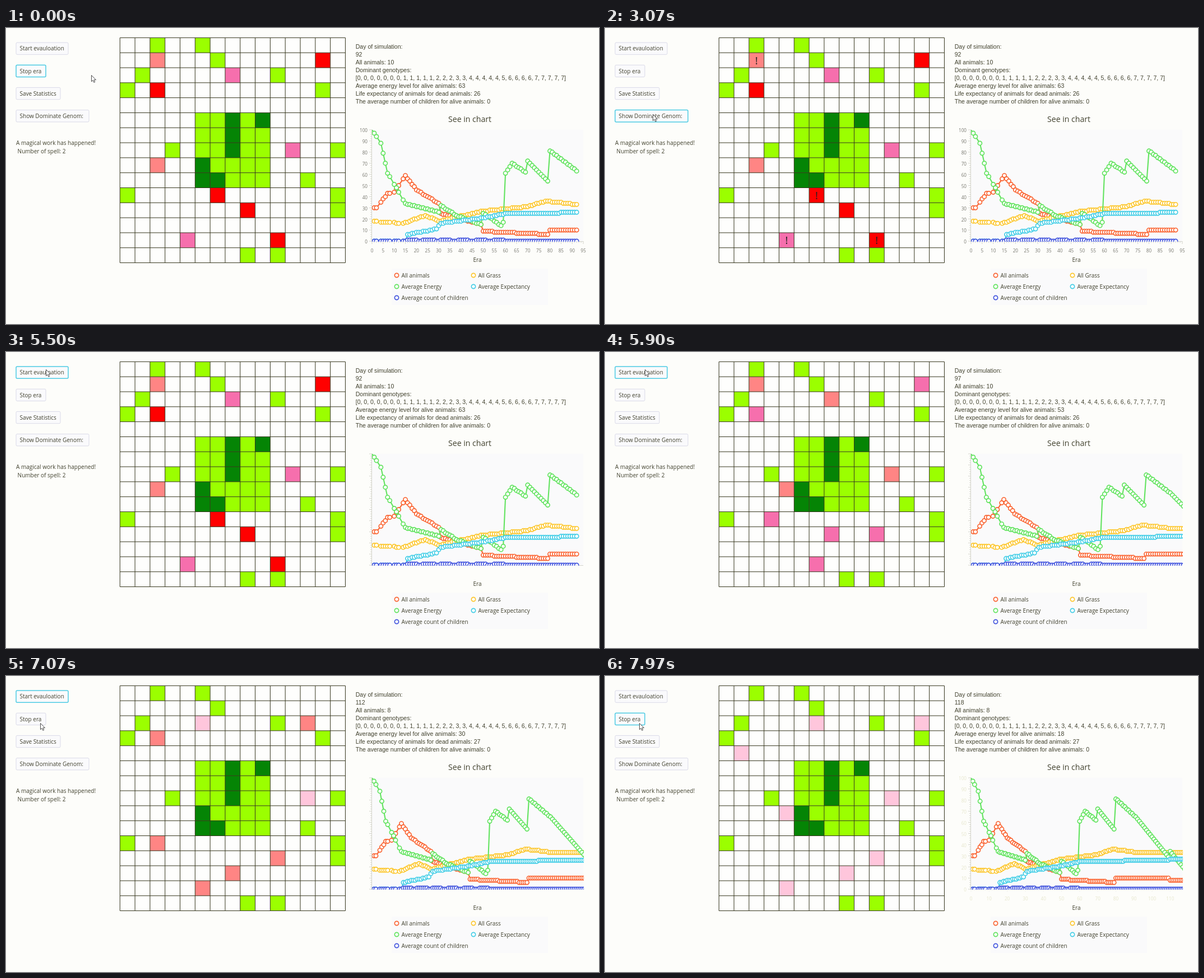
Write an HTML page with a canvas that moves like this. It is 1058 px wide and 529 px high and loops after 8 s.

```html
<!DOCTYPE html>
<html lang="en">
<head>
<meta charset="utf-8">
<title>Evolution simulation</title>
<style>
html, body { margin: 0; width: 100%; height: 100%; overflow: hidden; background: #fdfdfa; }
canvas { display: block; }
</style>
</head>
<body>
<canvas id="stage" width="1058" height="529"></canvas>
<script>
const ctx = document.getElementById('stage').getContext('2d');
const LOOP = 8000, GENOME_CLICK = 2900, START_CLICK = 5480, STOP_CLICK = 7508;
const FIRST_DAY = 92, DAYS_RUN = 26, DAY_MS = 78;
const UI = '"Open Sans", "Noto Sans", sans-serif', ARIAL = '"Liberation Sans", Arial, sans-serif';
const INK = '#42422f';

// Linear interpolation through key points [x, ...values].
function along(points, x) {
  const i = Math.max(0, Math.min(points.length - 2, points.findLastIndex(p => p[0] <= x)));
  const [a, b] = [points[i], points[i + 1]];
  const k = Math.min(1, Math.max(0, (x - a[0]) / (b[0] - a[0])));
  return a.slice(1).map((v, n) => v + (b[n + 1] - v) * k);
}

const cursorPath = [[0, 152, 84], [1500, 131, 96], [2900, 85, 154], [3300, 85, 154],
  [4530, 72, 12], [5200, 71, 31], [5900, 71, 31], [6750, 61, 84]];
const axisMax = [[5700, 95], [6400, 100.2], [7070, 107.7], [7970, 116.7]];

const curve = (...points) => day => Math.round(along(points, day)[0]);
const series = [
  { name: 'All animals', color: '#fa6432', x: 697, y: 442,
    value: curve([2, 30], [7, 43], [10, 44], [15, 59], [20, 46], [30, 34], [31, 25], [49, 15], [50, 9], [79, 6], [80, 10], [109, 10], [110, 8]) },
  { name: 'All Grass', color: '#fcc62c', x: 834, y: 442,
    value: curve([0, 18], [14, 16], [24, 23], [30, 18], [50, 27], [70, 31], [78, 36], [92, 33]) },
  { name: 'Average Energy', color: '#62e35f', x: 697, y: 462,
    value: curve([0, 100], [4, 88], [7, 61], [15, 34], [30, 26], [31, 32], [38, 23], [49, 15], [50, 25], [58, 14], [59, 17],
      [60, 61], [63, 70], [69, 62], [70, 72], [79, 54], [80, 81], [92, 63], [109, 29], [110, 34], [118, 18]) },
  { name: 'Average Expectancy', color: '#43cde6', x: 834, y: 462,
    value: curve([15, 0], [16, 6], [29, 11], [31, 16], [50, 21], [61, 25], [109, 26], [110, 27]) },
  { name: 'Average count of children', color: '#4355dd', x: 697, y: 482,
    value: day => day > 15 && day < 60 && Math.sin(day * .8) > -.5 ? 1 : 0 }
];

// Cells are a hexadecimal column and row.
const cellXY = id => [...id].map(c => parseInt(c, 16));
const grassCells = '20 50 61 12 a2 03 d3 37 e7 c9 0a ea eb 8e ae'.split(' ');
const darkCells = '75 95 76 77 58 59 69'.split(' ');

// Hunger grows by one a day: it sets an animal's shade and, at the limit, ends its life.
const HUNGER_STEP = 12, STARVED = 46;
const shades = ['#ff0000', '#f66fad', '#ff8584', '#ffc6dc'];
const routeDays = [92, 97, 112, 118];
const animal = (hunger, route) => ({
  hunger, path: route.split(' ').map((id, i) => [routeDays[i], ...cellXY(id)])
});
const herd = [
  animal(28, '21 21 41'), animal(28, '28 48 48'),
  animal(19, '72 72 52 62'), animal(19, 'b7 b7 c7 b7'),
  animal(12, '4d 6d 5d 4d'), animal(11, 'ad ab ab ab'),
  animal(11, 'd1 d1 c2 d2'), animal(11, '23 23 23 14'),
  animal(11, '6a 3a 2a 48'), animal(11, '8b 7b 7c 8c')
];
const dominant = ['21', '6a', '4d', 'ad'];
const genotype = '[' + [7, 5, 3, 2, 5, 1, 4, 5].flatMap((n, gene) => Array(n).fill(gene)).join(', ') + ']';

const buttons = [['Start evauloation', 93], ['Stop era', 53], ['Save Statistics', 79], ['Show Dominate Genom:', 130]];

function text(str, x, y, size = 10, { font = UI, color = INK, align = 'left' } = {}) {
  ctx.font = `${size}px ${font}`;
  ctx.fillStyle = color;
  ctx.textAlign = align;
  ctx.fillText(str, x, y);
}

function ring(x, y, color) {
  ctx.beginPath();
  ctx.arc(x, y, 3.6, 0, 7);
  ctx.fillStyle = '#fff';
  ctx.fill();
  ctx.strokeStyle = color;
  ctx.lineWidth = 1.7;
  ctx.stroke();
}

function drawButtons(focus) {
  buttons.forEach(([label, width], i) => {
    const y = 26 + i * 40.2;
    ctx.beginPath();
    ctx.roundRect(18, y, width, 21.3, 2);
    ctx.fillStyle = '#fafafc';
    ctx.fill();
    ctx.strokeStyle = i == focus ? '#4ccbe4' : '#dadae8';
    ctx.lineWidth = i == focus ? 1.5 : 1;
    ctx.stroke();
    text(label, 24.5, y + 14.3);
  });
  text('A magical work has happened!', 18, 209);
  text('Number of spell: 2', 20.6, 224);
}

const SIZE = 15, CELL = 26.81, LEFT = 203.3, TOP = 17.4;

function fillCell([col, row], color) {
  ctx.fillStyle = color;
  ctx.fillRect(LEFT + col * CELL, TOP + row * CELL, CELL, CELL);
}

function drawWorld(day, marked) {
  const side = CELL * SIZE;
  ctx.fillStyle = '#fefefd';
  ctx.fillRect(LEFT, TOP, side, side);
  for (let n = 0; n < 25; n++) fillCell([5 + n % 5, 5 + Math.floor(n / 5)], '#9bff00');
  grassCells.forEach(id => fillCell(cellXY(id), '#9bff00'));
  darkCells.forEach(id => fillCell(cellXY(id), '#058405'));
  for (const { hunger, path } of herd) {
    const now = hunger + day - FIRST_DAY;
    if (now < STARVED) fillCell(along(path, day).map(Math.round), shades[Math.floor(now / HUNGER_STEP)]);
  }
  ctx.strokeStyle = '#35351c';
  ctx.lineWidth = 1;
  ctx.beginPath();
  for (let i = 0; i <= SIZE; i++) {
    ctx.moveTo(LEFT + i * CELL, TOP);
    ctx.lineTo(LEFT + i * CELL, TOP + side);
    ctx.moveTo(LEFT, TOP + i * CELL);
    ctx.lineTo(LEFT + side, TOP + i * CELL);
  }
  ctx.stroke();
  if (marked) for (const [col, row] of dominant.map(cellXY)) {
    text('!', LEFT + (col + .5) * CELL, TOP + row * CELL + 20.5, 19, { color: '#222', align: 'center' });
  }
}

function drawFacts(day) {
  const [animals, , energy, expectancy, children] = series.map(s => s.value(day));
  [
    'Day of simulation:', day, 'All animals: ' + animals, 'Dominant genotypes:', genotype,
    'Average energy level for alive animals: ' + energy,
    'Life expectancy of animals for dead animals: ' + expectancy,
    'The average number of children for alive animals: ' + children
  ].forEach((line, i) => text(line, 623.7, 36.7 + i * 14.05, 10.56, { font: ARIAL }));
}

const X0 = 653, X1 = 1030, Y0 = 381, Y1 = 182;
const py = value => Y0 - value * (Y0 - Y1) / 100;

function drawAxes(px, max, t) {
  const settled = t < START_CLICK;
  const step = settled ? 5 : 10;
  const color = settled ? '#77776f' : '#a0a040';
  ctx.strokeStyle = '#d4d4cc';
  ctx.lineWidth = 1;
  ctx.beginPath();
  for (let v = 0; v <= 100; v += 2) {
    ctx.moveTo(X0 - (v % 10 ? 3 : 5), py(v));
    ctx.lineTo(X0, py(v));
  }
  ctx.moveTo(X0 - .5, Y1);
  ctx.lineTo(X0 - .5, Y0 + .5);
  ctx.lineTo(X1, Y0 + .5);
  ctx.stroke();
  // Labels vanish while the axis moves, then fade back in.
  ctx.globalAlpha = settled ? 1 : Math.max(0, (t - 7850) / 500);
  ctx.beginPath();
  for (let d = 0; d <= max; d++) {
    ctx.moveTo(px(d), Y0);
    ctx.lineTo(px(d), Y0 + (d % step ? 3 : 5));
    if (d % step == 0) text(d, px(d), 401, 8.2, { color, align: 'center' });
  }
  ctx.stroke();
  for (let v = 0; v <= 100; v += 10) text(v, 645, py(v) + 4.3, 8.2, { color, align: 'right' });
  ctx.globalAlpha = 1;
}

function drawChart(day, t) {
  const [max] = along(axisMax, t);
  const px = d => X0 + d * (X1 - X0) / max;
  ctx.fillStyle = '#fafafb';
  ctx.fillRect(X0, Y1, X1 - X0, Y0 - Y1);
  ctx.fillRect(688, 430, 279, 65);
  text('See in chart', 827.5, 168, 14.1, { align: 'center' });
  text('Era', 841, 418, 10, { align: 'center' });
  drawAxes(px, max, t);
  ctx.save();
  ctx.beginPath();
  ctx.rect(X0, Y1, X1 - X0 + 1, Y0 - Y1 + .7);
  ctx.clip();
  const days = [...Array(day + 1).keys()].filter(d => ![3, 9, 13].includes(d));
  for (const { color, value } of series) {
    ctx.beginPath();
    days.forEach(d => ctx.lineTo(px(d), py(value(d))));
    ctx.strokeStyle = color;
    ctx.lineWidth = 2.1;
    ctx.lineJoin = 'round';
    ctx.stroke();
    days.slice(1).forEach(d => ring(px(d), py(value(d)), color));
  }
  ctx.restore();
  for (const { name, color, x, y } of series) {
    ring(x, y, color);
    text(name, x + 8.5, y + 3.7);
  }
}

const arrow = new Path2D('M0 0V11.2L2.6 8.8L4.4 12.8L6.2 12L4.5 8.2H8Z');

function drawCursor(t) {
  const [x, y] = along(cursorPath, t);
  ctx.save();
  ctx.translate(x + .5, y + .5);
  ctx.fillStyle = '#fff';
  ctx.strokeStyle = '#3a3a3a';
  ctx.lineWidth = .9;
  ctx.fill(arrow);
  ctx.stroke(arrow);
  ctx.restore();
}

function draw(now) {
  const t = now % LOOP;
  const day = FIRST_DAY + Math.min(DAYS_RUN, Math.max(0, Math.floor((t - START_CLICK) / DAY_MS)));
  const focus = t < GENOME_CLICK ? 1 : t < START_CLICK ? 3 : t < STOP_CLICK ? 0 : 1;
  ctx.fillStyle = '#fdfdfa';
  ctx.fillRect(0, 0, 1058, 529);
  drawButtons(focus);
  drawWorld(day, focus == 3);
  drawFacts(day);
  drawChart(day, t);
  drawCursor(t);
}

const began = performance.now();
function tick() {
  draw(performance.now() - began);
  requestAnimationFrame(tick);
}
tick();
</script>
</body>
</html>
```
